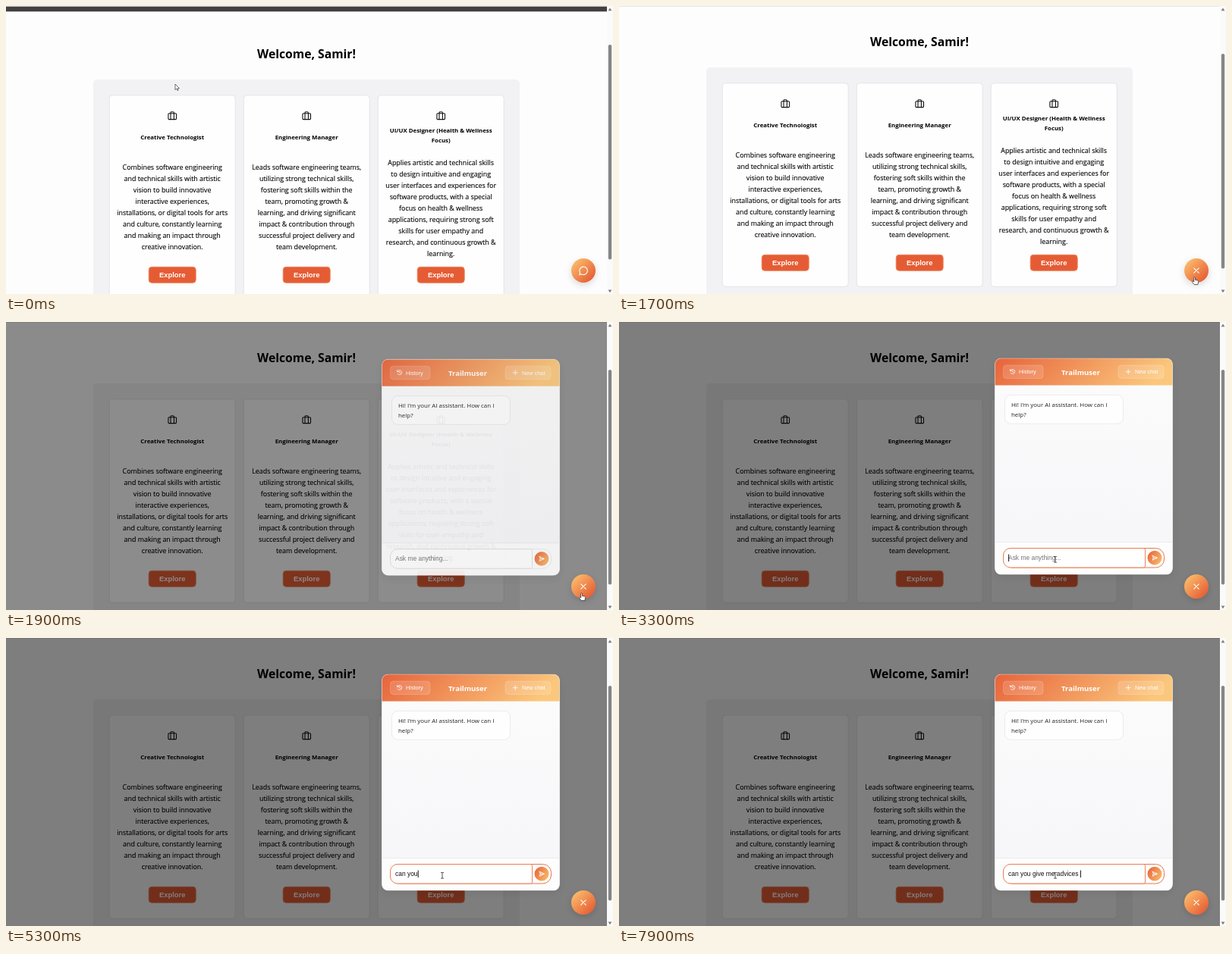
Write an HTML page that moves like this. It is 800 px wide and 380 px high and loops after 8 s.

```html
<!DOCTYPE html>
<html lang="en">
<head>
<meta charset="utf-8">
<title>Career assistant</title>
<style>
  html, body { margin: 0; width: 100%; height: 100%; overflow: hidden; background: #fdfdfd; }
  svg { display: block; width: 800px; height: 380px; }
  text { font-family: "Open Sans", "Noto Sans", sans-serif; white-space: pre; }
  .mid { text-anchor: middle; }
  .h1 { font-size: 15.7px; font-weight: 700; }
  .role { font-size: 7.85px; font-weight: 700; }
  .body { font-size: 8.9px; fill: #000; stroke: #000; stroke-width: 0.12px; }
  .btn, .ui, .field { font-family: "Liberation Sans", Arial, sans-serif; }
  .btn { font-size: 9.4px; font-weight: 700; fill: #fff; }
  .ui { font-size: 7.3px; fill: #fff; }
  .field { font-size: 8.45px; }
  .brand { font-size: 9.5px; font-weight: 700; fill: #fff; }
  .msg { font-size: 7.95px; fill: #202026; }
  .line { fill: none; stroke-linecap: round; stroke-linejoin: round; }
</style>
</head>
<body>
<svg id="stage" viewBox="0 0 800 380" xmlns="http://www.w3.org/2000/svg">
  <defs>
    <linearGradient id="warm" x1="0" y1="0" x2="1" y2="1">
      <stop offset="0.1" stop-color="#fbbd6c"/><stop offset="0.9" stop-color="#e55b33"/>
    </linearGradient>
    <linearGradient id="send" x1="0" y1="0" x2="1" y2="0.6">
      <stop offset="0" stop-color="#e65f37"/><stop offset="1" stop-color="#f8b468"/>
    </linearGradient>
    <linearGradient id="head" x1="0" y1="0" x2="1" y2="0.15">
      <stop offset="0" stop-color="#e7633b"/><stop offset="1" stop-color="#fbc77c"/>
    </linearGradient>
    <linearGradient id="chat" x1="0" y1="0" x2="0" y2="1">
      <stop offset="0" stop-color="#fbfbfc"/><stop offset="1" stop-color="#f7f7f9"/>
    </linearGradient>
    <filter id="glow" x="-50%" y="-50%" width="200%" height="200%">
      <feDropShadow dx="0" dy="3" stdDeviation="4" flood-color="#000" flood-opacity="0.15"/>
    </filter>
    <filter id="lift" x="-20%" y="-20%" width="140%" height="140%">
      <feDropShadow dx="0" dy="4" stdDeviation="6" flood-color="#000" flood-opacity="0.08"/>
    </filter>
    <clipPath id="round"><rect x="495.5" y="48" width="234" height="285" rx="8"/></clipPath>
  </defs>

  <rect width="800" height="380" fill="#fdfdfd"/>
  <g id="page"></g>
  <rect id="shade" width="792" height="380" fill="#000"/>

  <g id="panel">
    <g filter="url(#lift)"><rect x="495.5" y="48" width="234" height="285" rx="8" fill="#f9f9fb"/></g>
    <g clip-path="url(#round)">
      <rect x="495" y="83" width="235" height="207" fill="url(#chat)"/>
      <rect x="495" y="48" width="235" height="35.5" fill="url(#head)"/>
      <rect x="495" y="290" width="235" height="43" fill="#fdfdfd"/>
      <path d="M495 290.5H730" stroke="#ececf0"/>
    </g>
    <rect x="495.5" y="48" width="234" height="285" rx="8" fill="none" stroke="#fff" stroke-opacity="0.35"/>
    <g fill="#fff" fill-opacity="0.14" stroke="#fff" stroke-opacity="0.22" stroke-width="0.8">
      <rect x="506.5" y="57" width="52.5" height="17.5" rx="4"/>
      <rect x="658" y="57" width="60" height="17.5" rx="4"/>
    </g>
    <g class="line" stroke="#fff" stroke-width="0.8">
      <path d="M516 64.2a3 3 0 1 1 0.2 2.9M515.6 62.4v2h2M518.9 64v1.8l1.3 0.7"/>
      <path d="M668.2 65.7h6M671.2 62.7v6"/>
    </g>
    <text class="ui" x="527" y="68.4">History</text>
    <text class="ui" x="680" y="68.4">New chat</text>
    <text class="brand mid" x="608.5" y="69.6">Trailmuser</text>
    <rect x="508.5" y="96.2" width="156" height="38" rx="8" fill="#fefefe" stroke="#ebebef"/>
    <text class="msg" x="517" y="112.2">Hi! I'm your AI assistant. How can I</text>
    <text class="msg" x="517" y="125.2">help?</text>
    <rect id="pill" x="506.5" y="298.5" width="212" height="25.5" rx="11" fill="#fefefe"/>
    <path id="box" d="M516 298.5H691.5a2 2 0 0 1 2 2V322a2 2 0 0 1 -2 2H516a9.5 9.5 0 0 1 -9.5 -9.5V308a9.5 9.5 0 0 1 9.5 -9.5Z" fill="#fff"/>
    <text class="field" id="typed" x="513" y="314.3"></text>
    <rect id="caret" y="306.5" width="0.9" height="9.5" fill="#000"/>
    <circle cx="706" cy="311.2" r="9.4" fill="url(#send)"/>
    <path class="line" d="M703.2 308.2l6.2 3l-6.2 3l1 -3zM704.2 311.2h5" stroke="#fff" stroke-width="0.9"/>
  </g>

  <g filter="url(#glow)"><circle cx="761" cy="349" r="16" fill="url(#warm)"/></g>
  <g class="line" stroke="#fff" stroke-width="1.1">
    <path id="bubble" d="M756.6 351.8a5.2 5.2 0 1 1 2 2l-2.9 0.9z"/>
    <path id="cross" d="M757.8 345.8l6.4 6.4M764.2 345.8l-6.4 6.4"/>
  </g>

  <rect x="792" width="8" height="380" fill="#fafafa"/>
  <path d="M793.6 6.2l2.4 -3.6l2.4 3.6zM793.6 374.6l2.4 3.6l2.4 -3.6z" fill="#7d7d7d"/>
  <rect id="thumb" x="793.8" width="4.4" height="283.5" rx="2.2" fill="#868686"/>

  <g id="arrow">
    <path d="M0 0V7.6L1.8 6L3 8.6L4.2 8L3.1 5.6H5.4Z" fill="#fff" stroke="#333" stroke-width="0.7"/>
  </g>
  <g id="hand">
    <path d="M-0.9 0.6a0.9 0.9 0 0 1 1.8 0V3.4L4 4.1a1.4 1.4 0 0 1 1 1.4L4.3 9.6H-0.4L-3 6.2a0.9 0.9 0 0 1 1.3 -1.1L-0.9 6Z" fill="#fff" stroke="#222" stroke-width="0.7"/>
  </g>
  <g id="beam">
    <path class="line" d="M-1.5 -3.8H-0.5L0 -3.4L0.5 -3.8H1.5M0 -3.4V3.4M-1.5 3.8H-0.5L0 3.4L0.5 3.8H1.5" stroke="#222" stroke-width="0.8"/>
  </g>
</svg>
<script>
const LOOP = 8000, STEP = 100;
const MESSAGE = "can you give me advices ";
const OPEN_AT = 1600, FOCUS_AT = 2900, TYPE_AT = 4200, KEY_MS = 152;

const $ = id => document.getElementById(id);
const set = (id, attrs) => {
  for (const k in attrs) $(id).setAttribute(k, attrs[k]);
};
const show = (id, on) => set(id, { visibility: on ? "visible" : "hidden" });

const cards = [
  { x: 136, roles: ["Creative Technologist"], top: 199.6, lines: [
    "Combines software engineering", "and technical skills with artistic",
    "vision to build innovative", "interactive experiences,",
    "installations, or digital tools for arts", "and culture, constantly learning",
    "and making an impact through", "creative innovation."] },
  { x: 313, roles: ["Engineering Manager"], top: 199.6, lines: [
    "Leads software engineering teams,", "utilizing strong technical skills,",
    "fostering soft skills within the", "team, promoting growth &",
    "learning, and driving significant", "impact & contribution through",
    "successful project delivery and", "team development."] },
  { x: 490, roles: ["UI/UX Designer (Health & Wellness", "Focus)"], top: 193.8, lines: [
    "Applies artistic and technical skills", "to design intuitive and engaging",
    "user interfaces and experiences for", "software products, with a special",
    "focus on health & wellness", "applications, requiring strong soft",
    "skills for user empathy and", "research, and continuous growth &", "learning."] }
];

const label = (cls, x, y, s) =>
  `<text class="${cls} mid" x="${x}" y="${y}">${s.replace(/&/g, "&amp;")}</text>`;

function cardMarkup({ x, roles, top, lines }) {
  const cx = x + 83.2;
  const roleTop = roles.length > 1 ? 150.8 : 160;
  return `<rect x="${x + 0.2}" y="101.8" width="166" height="268.5" rx="4" fill="#fefefe" stroke="#e4e4e8"/>
    <g class="line" stroke="#111" stroke-width="1.1" transform="translate(${cx} 129)">
      <rect x="-5.3" y="-3.2" width="10.6" height="7.8" rx="1"/>
      <path d="M-2.2 4.6V-4.3a1 1 0 0 1 1 -1H1.2a1 1 0 0 1 1 1V4.6"/>
    </g>
    ${roles.map((s, i) => label("role", cx, roleTop + i * 13.5, s)).join("")}
    ${lines.map((s, i) => label("body", cx, top + i * 15, s)).join("")}
    <rect x="${cx - 31}" y="328.3" width="62" height="21" rx="4" fill="#e55c34" stroke="#ee8358" stroke-width="0.9"/>
    ${label("btn", cx, 342, "Explore")}`;
}

$("page").innerHTML = `<rect y="-20" width="792" height="11.3" fill="#444040"/>
  ${label("h1", 396, 53.3, "Welcome, Samir!")}
  <rect x="115" y="81" width="562" height="330" rx="5" fill="#f2f2f4"/>
  ${cards.map(cardMarkup).join("")}`;
$("page").insertAdjacentHTML("afterend", '<rect width="792" height="0.8" fill="#e2e2e2"/>');

// Rows of [time, value, ...], linear in between
const track = (rows, t) => {
  const j = rows.findIndex(r => r[0] > t);
  if (j < 0) return rows[rows.length - 1].slice(1);
  if (j === 0) return rows[0].slice(1);
  const a = rows[j - 1], b = rows[j], k = (t - a[0]) / (b[0] - a[0]);
  return a.slice(1).map((v, i) => v + (b[i + 1] - v) * k);
};

const scrollKeys = [[0, 16], [100, 12], [200, 6], [300, 2], [400, 0]];
const pointerKeys = [
  [0, 223, 103], [200, 245, 112], [500, 299, 136], [600, 302, 137.5],
  [800, 350, 168], [1100, 560, 270], [1400, 742, 348], [1500, 758.6, 358],
  [2100, 758.6, 358], [2300, 725, 343], [2600, 612, 317], [2800, 575, 313.3]
];
// time, shade opacity, panel opacity, panel drop
const openKeys = [[1700, 0, 0, 10], [1800, 0.24, 0.45, 6], [1900, 0.45, 0.91, 1.2], [2000, 0.5, 1, 0]];

const near = (x, y, cx, cy, r) => Math.hypot(x - cx, y - cy) < r;

function pointerKind(x, y, t) {
  if (near(x, y, 761, 349, 16)) return "hand";
  if (t < 1800) return "arrow";
  if (near(x, y, 706, 311.2, 9.4)) return "hand";
  return x > 506 && x < 694 && y > 298 && y < 324 ? "beam" : "arrow";
}

function draw(t) {
  const [scroll] = track(scrollKeys, t);
  set("page", { transform: `translate(0 ${scroll})` });
  set("thumb", { y: 63 - scroll * 0.75 });

  const [dim, alpha, drop] = track(openKeys, t);
  set("shade", { opacity: dim });
  set("panel", { opacity: alpha, transform: `translate(0 ${drop})` });
  show("bubble", t < OPEN_AT);
  show("cross", t >= OPEN_AT);

  const focused = t >= FOCUS_AT;
  set("pill", { stroke: focused ? "#e8764c" : "#ebebef" });
  set("box", { stroke: focused ? "#e8764c" : "#dedee3", "stroke-width": 0.9 });

  const count = Math.max(0, Math.min(MESSAGE.length, Math.floor((t - TYPE_AT) / KEY_MS)));
  const typed = $("typed");
  typed.textContent = count ? MESSAGE.slice(0, count) : "Ask me anything...";
  set("typed", { fill: count ? "#111" : "#757575" });
  const end = count ? typed.getComputedTextLength() : 0;
  set("caret", { x: 513.2 + end });
  show("caret", focused && (count > 0 || Math.floor((t - FOCUS_AT) / 500) % 2 === 0));

  const [x, y] = track(pointerKeys, t);
  const kind = pointerKind(x, y, t);
  for (const id of ["arrow", "hand", "beam"]) {
    show(id, id === kind);
    set(id, { transform: `translate(${x} ${y})` });
  }
}

const start = performance.now();
function tick() {
  const t = (performance.now() - start) % LOOP;
  draw(Math.floor(t / STEP) * STEP);
  requestAnimationFrame(tick);
}
tick();
</script>
</body>
</html>
```
